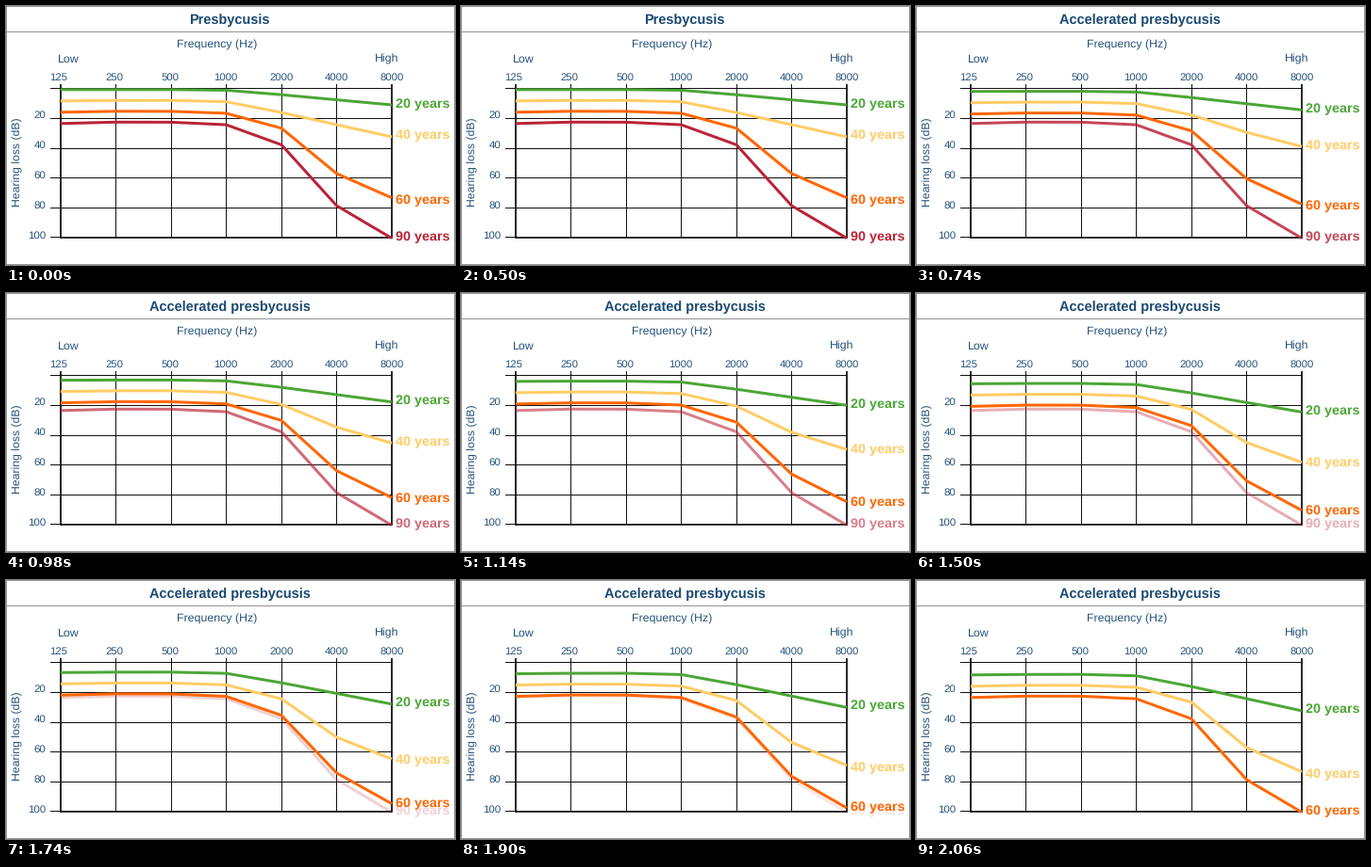
Animation of 476x275 px, one loop 7.86 s. Source, as a matplotlib script:

```python
import numpy as np
import matplotlib.pyplot as plt
from matplotlib.animation import FuncAnimation
from matplotlib.collections import LineCollection

W, H, DPI = 476, 275, 100
PX = 72 / DPI                      # points per pixel
TICK_MS, LOOP_MS = 20, 7860
STEPS = 20

plt.rcParams.update({"font.family": "Liberation Sans", "text.hinting": "none"})

NAVY, LABEL, GREY, INK = "#1b4a73", "#26527b", "#949494", "#111111"

OCTAVES = np.arange(7)
XS = 58 + 58.5 * OCTAVES
ROWS = 87.9 + 31.6 * np.arange(6)
LEFT, RIGHT, TOP, BOTTOM = XS[0], XS[-1], ROWS[0], ROWS[-1]

# age, colour, label baseline, slope per octave, depth of the cliff
GROUPS = [
    (20, "#4ca636", 108.0, 5.4, 0),
    (40, "#ffcc66", 140.7, 12.9, 0),
    (60, "#ff6600", 210.0, 0, 96.5),
    (90, "#ba2338", 249.0, 0, 129.5),
]


def loss_curve(rank, slope, cliff):
    """Flat low tones, then a soft ramp or an S-shaped fall above 1 kHz."""
    level = 88.8 + 11.4 * rank + 0.6 * rank * np.exp(-2.0 * OCTAVES)
    ramp = np.logaddexp(0, 6 * (OCTAVES - 3)) / 6
    fall = 1 / (1 + np.exp(-2.25 * (OCTAVES - 4.65)))
    return level + slope * ramp + cliff * fall


fig = plt.figure(figsize=(W / DPI, H / DPI), dpi=DPI, facecolor="white")
ax = fig.add_axes([0, 0, 1, 1])
ax.set(xlim=(0, W), ylim=(H, 0))
ax.axis("off")


def text(x, y, s, size, color=LABEL, ha="center", va="baseline", **kw):
    return ax.text(x, y, s, fontsize=size * PX, color=color, ha=ha, va=va, **kw)


def segments(segs, color, width):
    lines = LineCollection(segs, colors=color, linewidths=width * PX,
                           capstyle="butt", zorder=1)
    lines.set_snap(False)
    ax.add_collection(lines)


def mid(v):
    """Centre of the pixel that holds v."""
    return np.floor(v) + 0.5


# panel border and title rule
segments([[(0, y), (W, y)] for y in (0.5, 27.5, H - 0.5)], GREY, 1)
segments([[(x, 0), (x, H)] for x in (0.5, W - 0.5)], GREY, 1)

# grid and heavier outer axes
segments([[(47, mid(y)), (RIGHT, mid(y))] for y in ROWS], INK, 1)
segments([[(mid(x), 83), (mid(x), BOTTOM)] for x in XS[1:-1]], INK, 1)
segments([[(x, 83), (x, BOTTOM + 0.9)] for x in (LEFT, RIGHT)], INK, 1.8)
segments([[(LEFT, BOTTOM), (RIGHT, BOTTOM)]], INK, 1.8)

# captions
title = text(237, 19, "", 14.5, NAVY, weight="bold")
text(223.5, 45, "Frequency (Hz)", 12.4)
text(66, 59.4, "Low", 12.4)
text(404, 59.4, "High", 12.4)
text(12.2, 165.5, "Hearing loss (dB)", 12.2, va="center", rotation=90)
for k in OCTAVES:
    text(55.6 + 59 * k, 78.8, str(125 * 2 ** k), 11.4)
for k in range(5):
    text(42.5, 119 + 31.9 * k, str(20 * (k + 1)), 11.5, ha="right")

# curves with their labels, oldest at the back
shapes = [loss_curve(k, *g[3:]) for k, g in enumerate(GROUPS)]
bases = [g[2] for g in GROUPS]
lines, tags = [], []
for k, (age, color, base, *_) in enumerate(GROUPS):
    lines += ax.plot(XS, shapes[k], color=color, lw=3 * PX, zorder=10 - k,
                     solid_capstyle="butt", solid_joinstyle="round")
    tags.append(text(412.7, base, f"{age} years", 14.4, color, ha="left",
                     weight="bold", zorder=10 - k))


def step_at(ms):
    """80 ms steps from 500 ms, with one 40 ms hold after 1300 ms."""
    if ms >= 1340:
        ms = max(ms - 40, 1300)
    return int(np.clip((ms - 420) // 80, 0, STEPS))


def mix(a, b, p):
    return a + (b - a) * p


def update(i):
    step = step_at(i * TICK_MS)
    p = max(step - 1, 0) / (STEPS - 1)
    title.set_text("Accelerated presbycusis" if step > 1 else "Presbycusis")

    # each age group drifts onto the curve of the next older one
    for k in range(len(GROUPS) - 1):
        lines[k].set_ydata(mix(shapes[k], shapes[k + 1], p))
        tags[k].set_y(mix(bases[k], bases[k + 1], p))
    for artist in (lines[-1], tags[-1]):
        artist.set_alpha(1 - p)
    return [title, *lines, *tags]


anim = FuncAnimation(fig, update, frames=LOOP_MS // TICK_MS, interval=TICK_MS,
                     repeat=True, repeat_delay=0, blit=False)
plt.show()
```
